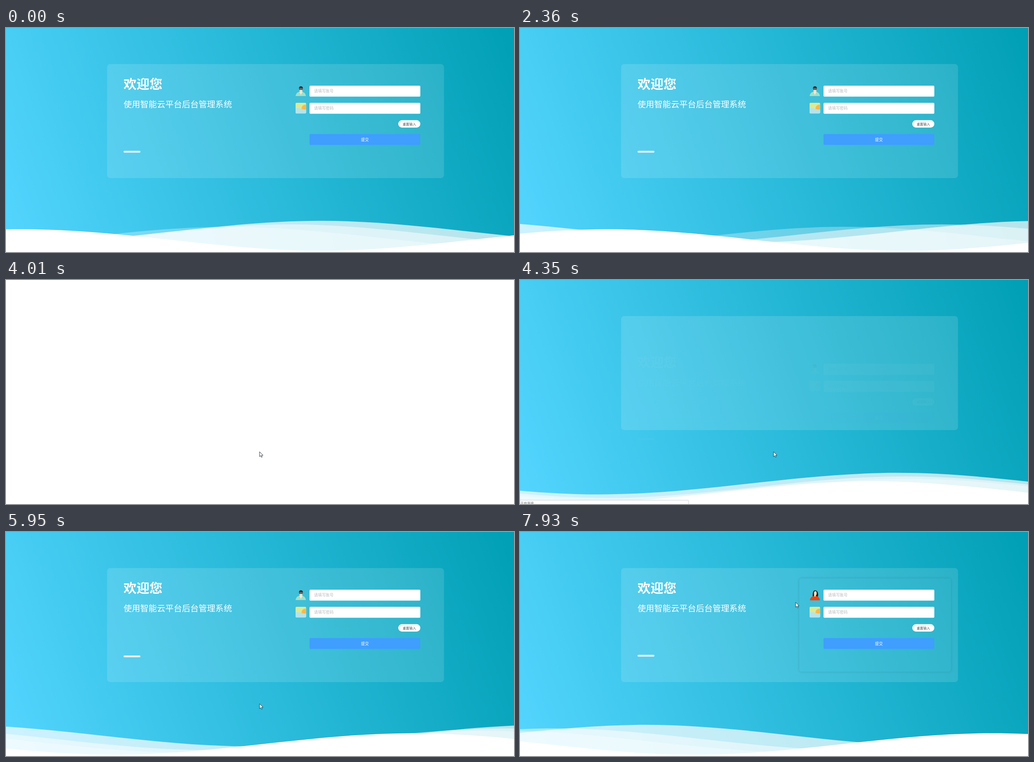
Write an HTML page that moves like this. It is 1128 px wide and 497 px high and loops after 8 s.

```html
<!DOCTYPE html>
<html lang="zh">
<head>
<meta charset="utf-8">
<style>
html, body { margin: 0; width: 100%; height: 100%; overflow: hidden; }
body { position: relative; background: linear-gradient(70deg, #54d5ff, #009fb5); }
svg { display: block; }
#stage { position: absolute; left: 0; top: 0; width: 1128px; height: 497px; font-family: "Noto Sans CJK SC", "Noto Sans CJK", sans-serif; }
#glow { position: absolute; left: 620px; top: 103px; width: 337px; height: 207px; border-radius: 5px; box-shadow: 0 0 5px rgba(0, 70, 90, .28); }
</style>
</head>
<body>
<div id="glow"></div>
<svg id="stage" viewBox="0 0 1128 497">
  <defs>
    <path id="wave" d="M-160 44c30 0 58-18 88-18s58 18 88 18 58-18 88-18 58 18 88 18v44h-352z"/>
  </defs>
  <rect x="224.5" y="80" width="748" height="253" rx="7" fill="#fff" fill-opacity=".13"/>

  <g fill="#fff">
    <text id="title" x="261" y="135" font-size="28.8" font-weight="700">欢迎您</text>
    <text id="subtitle" x="261" y="176" font-size="18.55">使用智能云平台后台管理系统</text>
    <rect id="bar" x="261" y="272.4" width="37.5" height="4" rx="2" fill="#f0f6f2"/>
  </g>

  <g id="form" font-size="8.7">
    <g id="man">
      <path d="M643 151q1-8 8-9.500h7q7 1.500 8 9.500z" fill="#9fe0c8"/>
      <path d="M651.500 141.500l3.200 7 3.800-7-1.500-3h-4z" fill="#f6e6d6"/>
      <ellipse cx="654.800" cy="135.500" rx="3.700" ry="5" fill="#f3d3bd"/>
      <path d="M650.700 135q-1-5.500 4.100-5.500t4.300 5.500l-1-1.500h-6.400z" fill="#222"/>
      <path d="M651 134.500h7.800v1.500q-1.800 2-3.900 0-2.100 2-3.900 0z" fill="#17222c"/>
    </g>
    <g id="woman">
      <path d="M650 145q-1-15.500 5-15.500t7 8q.500 5-2 7.500z" fill="#231f20"/>
      <path d="M643.500 151.500q1-8 9-9.500h5q8 1.500 8.500 9.500z" fill="#f0430f"/>
      <path d="M653 138h4v4.500q-2 2-4 0z" fill="#efd0a8"/>
      <ellipse cx="655.800" cy="136" rx="3" ry="4.800" fill="#f6dfba"/>
    </g>
    <rect x="643" y="166" width="23.400" height="23.400" rx="2" fill="#dcea92"/>
    <path d="M643 178q7-1 13 1.500t10.400 1v6.900q0 2-2 2h-19.400q-2 0-2-2z" fill="#b3e4ee"/>
    <path d="M666.400 170q-10.400 0-10.400 9.500 5 2 10.400 1.500z" fill="#fbb84b"/>
    <g fill="#fff">
      <rect x="674" y="128" width="246" height="24.300" rx="2"/>
      <rect x="674" y="166" width="246" height="24.300" rx="2"/>
      <rect x="871" y="204.500" width="49" height="16.500" rx="8.250"/>
    </g>
    <g fill="#b9bcc3">
      <text x="684" y="143.300">请填写账号</text>
      <text x="684" y="181.300">请填写密码</text>
    </g>
    <text x="895.500" y="215.600" font-size="7.400" text-anchor="middle" fill="#505357">重置输入</text>
    <rect x="674" y="235.300" width="246" height="24.300" rx="2" fill="#409eff"/>
    <text x="797" y="250.700" font-size="8.700" text-anchor="middle" fill="#fff">提交</text>
  </g>

  <svg id="waves" y="422.450" width="1128" height="74.550" viewBox="0 24 150 28" preserveAspectRatio="none" fill="#fff"></svg>

  <rect id="blank" width="1128" height="497" fill="#fff"/>
  <g id="status">
    <rect x="-2" y="488.500" width="376.500" height="12" rx="1.500" fill="#fff" stroke="#d0d4d8"/>
    <text x="1" y="498" font-size="7.400" fill="#666">正在连接</text>
  </g>
  <path id="cursor" d="M0 0v11l2.500-2.300 1.700 3.700 1.800-.8-1.700-3.600h3.500z" fill="#fff" stroke="#1c2b33" stroke-width=".9"/>
</svg>
<script>
const $ = id => document.getElementById(id);
const LOOP = 8000, UNLOAD = 4010, RELOAD = 4350;

function bezier(x1, y1, x2, y2) {
  const at = (a, b, u) => 3 * a * u * (1 - u) ** 2 + 3 * b * u * u * (1 - u) + u ** 3;
  return x => {
    if (x <= 0) return 0;
    if (x >= 1) return 1;
    let lo = 0, hi = 1;
    for (let i = 0; i < 24; i++) {
      const mid = (lo + hi) / 2;
      if (at(x1, x2, mid) < x) lo = mid; else hi = mid;
    }
    return at(y1, y2, lo);
  };
}
const drift = bezier(.55, .5, .45, .5);
const ease = bezier(.25, .1, .25, 1);

// y offset, opacity, period and head start in seconds
const waves = [[0, .7, 7, 2], [3, .5, 10, 3], [5, .3, 13, 4], [7, 1, 20, 5]].map(([y, alpha, period, lead]) => {
  const el = document.createElementNS("http://www.w3.org/2000/svg", "use");
  el.setAttribute("href", "#wave");
  el.setAttribute("fill-opacity", alpha);
  $("waves").append(el);
  return { el, y, period, lead };
});

// id, duration in seconds, rise in pixels
const entrances = [["title", 1.5, 60], ["subtitle", 2, 60], ["bar", 2.3, 80], ["form", 1.5, 60]];

// time, x, y
const track = [
  [2950, 561, 500], [3250, 563, 381], [6150, 563, 381], [6700, 567, 325],
  [6850, 567, 325], [7350, 640, 200], [7600, 636, 142], [7900, 612, 156]
];

const show = (id, on) => $(id).setAttribute("visibility", on ? "visible" : "hidden");
const move = (el, x, y) => el.setAttribute("transform", `translate(${x} ${y})`);

function cursorAt(t) {
  const i = track.findIndex(p => p[0] > t);
  if (i < 0) return track[track.length - 1].slice(1);
  if (i === 0) return track[0].slice(1);
  const [a, b] = [track[i - 1], track[i]];
  const k = (t - a[0]) / (b[0] - a[0]);
  return [a[1] + (b[1] - a[1]) * k, a[2] + (b[2] - a[2]) * k];
}

// The screen refreshes in coarse steps
function snap(t) {
  if (t < UNLOAD) return Math.floor(t / 118) * 118;
  if (t < RELOAD) return UNLOAD;
  return RELOAD + Math.floor((t - RELOAD) / 115) * 115;
}

// Seconds since the page was opened
function pageAge(t) {
  if (t < UNLOAD) return 48.33 + t / 1000;
  if (t < 5110) return .08 + Math.max(0, t - RELOAD) * .00141;
  return (t - 3960) / 1000;
}

function draw(now) {
  const raw = now % LOOP, t = snap(raw), age = pageAge(t);
  for (const w of waves) {
    const phase = (age + w.lead) % w.period / w.period;
    move(w.el, 48 - 90 + 175 * drift(phase), w.y);
  }
  for (const [id, duration, rise] of entrances) {
    const k = ease(age / duration);
    move($(id), 0, rise * (1 - k));
    $(id).setAttribute("opacity", k);
  }
  const hover = t >= 7330;
  show("man", !hover);
  show("woman", hover);
  $("glow").style.opacity = Math.min(1, Math.max(0, (t - 7330) / 300));
  show("blank", raw >= UNLOAD && raw < RELOAD);
  show("status", raw >= RELOAD && raw < 4700);
  show("cursor", t > 2950);
  move($("cursor"), ...cursorAt(t));
}

function tick() {
  draw(performance.now());
  requestAnimationFrame(tick);
}
tick();
</script>
</body>
</html>
```
